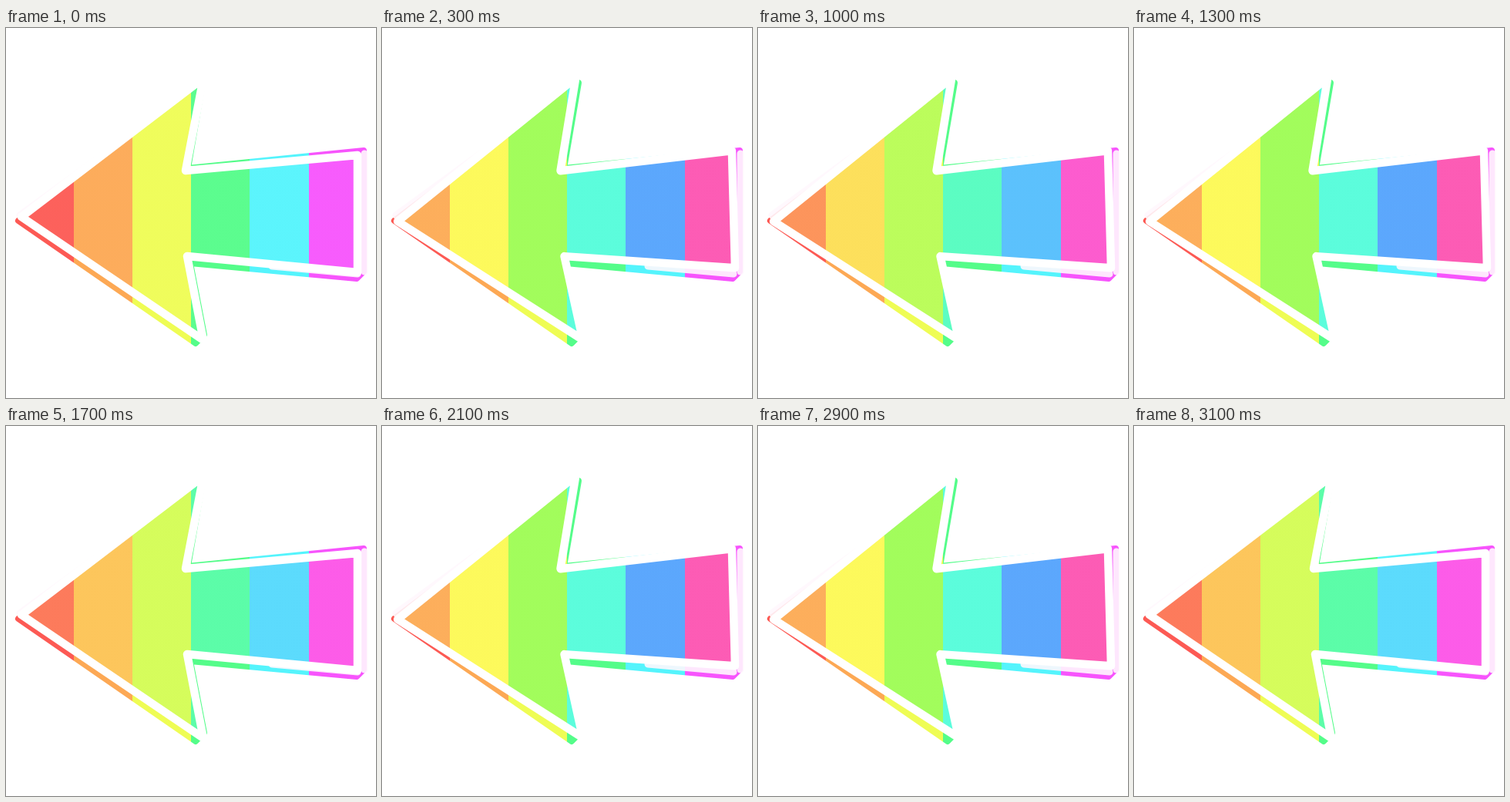
These frames come from a looping animation (480 by 480 pixels, 3.2 s). An HTML page with a canvas:

```html
<!DOCTYPE html>
<html lang="en">
<head>
<meta charset="utf-8">
<title>Rainbow arrow</title>
<style>
html, body { margin: 0; width: 100%; height: 100%; overflow: hidden; background: #fff; }
canvas { display: block; width: 480px; height: 480px; }
</style>
</head>
<body>
<canvas id="stage" width="480" height="480"></canvas>
<script>
const ctx = document.getElementById('stage').getContext('2d');
const SIZE = 480, MID = SIZE / 2;
const STEP = 100, STEPS = 8;
const TILT = -0.027;
const HUES = [2, 30, 65, 139, 183, 298];

// Chalk outline of the arrow, and the coloured shape lying behind it
const ARROW = [[20, 245], [256, 65], [233, 185], [456, 165], [456, 317], [235, 296], [256, 405]];
const BACK = [[16, 250], [255, 71], [236, 182], [464, 159], [464, 316], [455, 325],
  [239, 305], [257, 398], [246, 409]];
// Pale smears left by the chalk
const SMEARS = [
  [[18, 243], [128, 163]],
  [[465, 163], [465, 316]],
  [[456, 319], [345, 309]]
];

// Hard-edged vertical stripes, about 76 px wide
function rainbow(shift, light) {
  const paint = ctx.createLinearGradient(0, 0, SIZE, 0);
  HUES.forEach((hue, i) => {
    const color = `hsl(${hue + shift}, 97%, ${light}%)`;
    const start = i ? 11.7 + 76.2 * i : 0;
    const end = i < HUES.length - 1 ? 11.7 + 76.2 * (i + 1) : SIZE;
    paint.addColorStop(start / SIZE, color);
    paint.addColorStop(end / SIZE, color);
  });
  return paint;
}

// The path keeps its tilt, while the stripes stay upright
function trace(points, angle = 0) {
  ctx.save();
  ctx.translate(MID, MID);
  ctx.rotate(angle);
  ctx.translate(-MID, -MID);
  ctx.beginPath();
  points.forEach(([x, y]) => ctx.lineTo(x, y));
  ctx.restore();
}

function stroke(width, color) {
  ctx.lineWidth = width;
  ctx.strokeStyle = color;
  ctx.stroke();
}

function fill(color) {
  ctx.fillStyle = color;
  ctx.fill();
}

function draw(time) {
  const phase = Math.floor(time / STEP) % STEPS;
  const shift = 9.6 * (4 - Math.abs(4 - phase));
  const angle = phase >= 2 && phase <= 5 ? TILT : 0;

  ctx.fillStyle = '#fff';
  ctx.fillRect(0, 0, SIZE, SIZE);
  ctx.lineJoin = ctx.lineCap = 'round';

  const base = rainbow(0, 66);
  trace(BACK);
  ctx.closePath();
  fill(base);
  stroke(8, base);

  for (const smear of SMEARS) {
    trace(smear);
    stroke(9, 'rgba(255, 248, 253, 0.9)');
  }

  trace(ARROW, angle);
  ctx.closePath();
  fill(rainbow(shift, 67.5));
  stroke(10.5, '#fff');
}

function tick() {
  draw(performance.now());
  requestAnimationFrame(tick);
}
tick();
</script>
</body>
</html>
```
